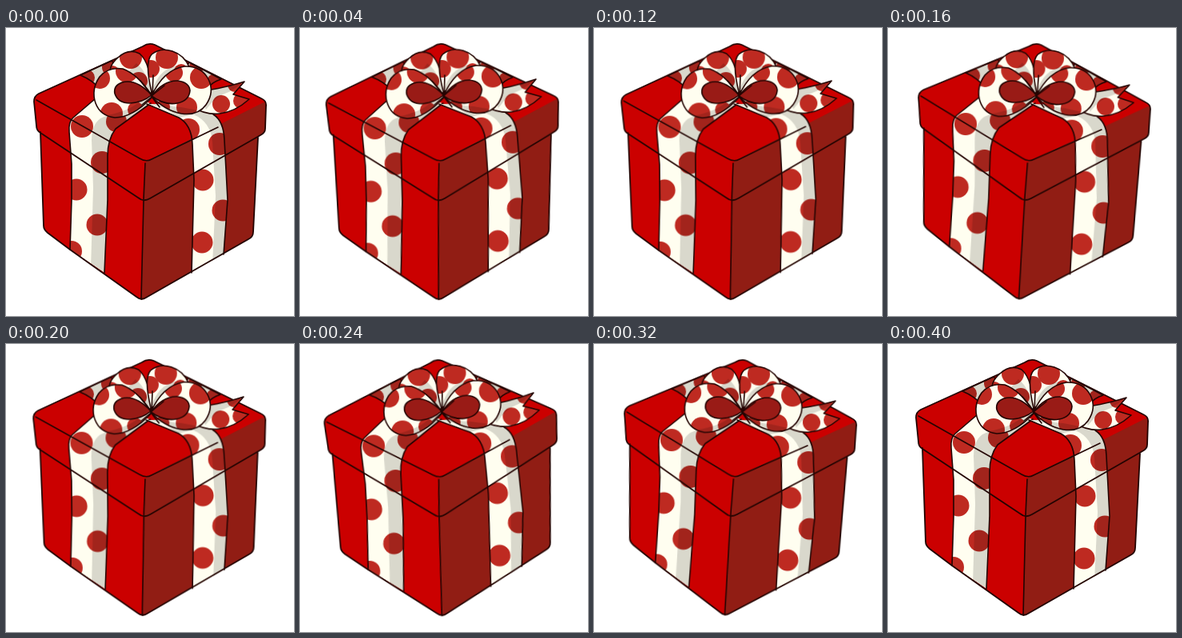
Animation, 360 px wide and 360 px high, one loop 0.96 s. Source, as an HTML page:

```html
<!DOCTYPE html>
<html lang="en">
<head>
<meta charset="utf-8">
<title>Gift box</title>
<style>
  html, body { margin: 0; width: 100%; height: 100%; overflow: hidden; background: #fff; }
  svg { display: block; width: 100vw; height: 100vh; }
  #box { transform-origin: 180px 180px; }
  .line { fill: none; stroke: #230402; stroke-width: 1.6; stroke-linecap: round; stroke-linejoin: round; }
</style>
</head>
<body>
<svg viewBox="0 0 360 360"><g id="box"></g></svg>
<script>
const NS = 'http://www.w3.org/2000/svg';
const RED = '#cb0000', DARK = '#911d14', CREAM = '#fffef0', DOT = '#be2a21', SHADE = 'rgba(0,0,0,.15)';
const box = document.getElementById('box');
let clips = 0;

function add(parent, tag, attrs) {
  const el = document.createElementNS(NS, tag);
  for (const key in attrs) el.setAttribute(key, attrs[key]);
  parent.appendChild(el);
  return el;
}
const fill = (d, color, parent = box) => add(parent, 'path', { d, fill: color });
const line = (d, width = 1.6) => add(box, 'path', { d, class: 'line', style: `stroke-width:${width}` });

// Dotted cloth: dots and shadow are clipped to the shape.
function cloth(d, dots, shade, edge = d) {
  const id = 'clip' + clips++;
  fill(d, '', add(box, 'clipPath', { id }));
  const g = add(box, 'g', { 'clip-path': `url(#${id})` });
  fill(d, CREAM, g);
  for (const [cx, cy, r] of dots) add(g, 'circle', { cx, cy, r, fill: DOT });
  if (shade) fill(shade, SHADE, g);
  line(edge);
}

// Body and lid
const body = 'M43 130L47 247Q47 252 52 256L80 277L163 336Q169 341 175 337L303 264Q309 261 309 255L315 135L172 213Z';
const lid = 'M41 82L171 23Q178 18 186 21L319 88Q326 91 325 98L324 126Q324 131 318 134L180 213Q172 218 165 212L43 131Q38 128 38 122L35 92Q35 85 41 82Z';
fill(body, RED);
fill('M172 213L315 135L309 255Q309 261 303 264L175 337L169 340Z', DARK);
fill(lid, RED);
fill('M175 167L322 93Q326 94 325 98L324 126Q324 131 318 134L180 213L172 216Z', DARK);

// Ribbon reaching the back edges of the lid
cloth('M93 59L132 41L160 70L120 78Q108 65 93 59Z', [[101, 62, 10], [131, 49, 11]],
  'M93 59L132 41L160 70L120 78Z');
cloth('M229 43L269 64Q258 67 250 77L215 65Z', [[261, 67, 10], [238, 49, 9]],
  'M229 43L269 64L250 77L215 65Z');

// Ribbon down both faces
cloth('M112 88L84 112Q78 117 79 130L82 170L82 215L80 277L123 306L127 215L127 160Q127 139 137 126L181 94L145 84Z',
  [[95, 123, 14], [138, 117, 13], [120, 168, 14], [88, 202, 13.5], [114, 246, 13.5], [82, 279, 13]],
  'M181 94L150 99L118 113Q107 121 107 140L109 200L106 300L130 310V160L140 126Z',
  'M112 88L84 112Q78 117 79 130L82 170L82 215L80 277M123 306L127 215L127 160Q127 139 137 126L181 94');
cloth('M176 95L216 112Q232 121 233 145L235 190L232 306L272 283L277 215L273 140Q272 116 259 108L220 94Z',
  [[228, 127, 14], [267, 145, 14], [246, 190, 13.5], [271, 228, 13.5], [245, 268, 13.5]],
  'M176 95L196 99L216 112L234 108Q256 117 258 143L262 210L258 296L285 280V140L262 104L215 90Z',
  'M176 95L216 112Q232 121 233 145L235 190L232 306M272 283L277 215L273 140Q272 116 259 108');

// Box lines
line(body.replace('L315 135L172 213Z', 'L315 137'), 1.8);
line('M172 216L169 339');
line('M38 90L167 163Q175 168 182 164L265 124');
line('M174 169L172 214');
line(lid, 1.8);

// Bow: tail, back loops, front loops
cloth('M239 79Q262 78 298 67L284 83L304 89Q286 105 267 107Q251 109 232 99Z',
  [[269, 95, 11], [294, 91, 10], [286, 71, 9]],
  'M239 79Q262 78 298 67L281 79Q262 85 250 102Z');
cloth('M182 82Q181 44 167 32Q153 25 140 37Q126 49 132 61Z',
  [[156, 37, 14], [132, 58, 11], [166, 66, 11]], 'M182 82Q177 55 163 44L150 58L165 78Z');
cloth('M182 80Q173 43 182 33Q193 24 208 29Q223 34 229 49L215 65Z',
  [[201, 37, 14], [181, 51, 11], [219, 54, 9]], 'M182 80Q190 52 213 47L232 51L212 72Z');
cloth('M182 84Q165 58 146 51Q128 48 117 61Q106 77 112 94Q118 110 136 112Q158 112 182 87Z',
  [[117, 63, 13], [151, 54, 14], [132, 107, 14], [162, 102, 10]],
  'M182 87Q158 112 136 112L126 109Q154 104 168 91Z');
cloth('M182 85Q197 52 223 48Q244 47 253 64Q261 80 250 96Q240 110 219 107Q198 103 182 85Z',
  [[210, 56, 11], [244, 62, 14], [226, 99, 13], [196, 99, 9]],
  'M182 85Q200 99 219 99L240 103Q226 112 207 105Z');
for (const hole of [
  'M182 84Q163 63 145 68Q134 72 136 82Q140 94 155 94Q171 93 182 84Z',
  'M182 85Q197 65 215 66Q229 68 230 78Q229 91 214 94Q198 97 182 85Z'
]) {
  fill(hole, '#991b16');
  line(hole);
}
line('M182 84L168 66M183 84L184 59M183 84L198 72M182 86L170 96M183 87L192 99');

// Wobble: [ms, degrees], two held poses between stops
const LOOP = 960;
const stops = [[0, 0], [80, -3], [160, 2], [240, -3], [320, 2], [400, 0], [LOOP, 0]];
box.animate(stops.map(([ms, deg]) => ({
  offset: ms / LOOP, transform: `rotate(${deg}deg)`, easing: 'steps(2, end)'
})), { duration: LOOP, iterations: Infinity });
</script>
</body>
</html>
```
